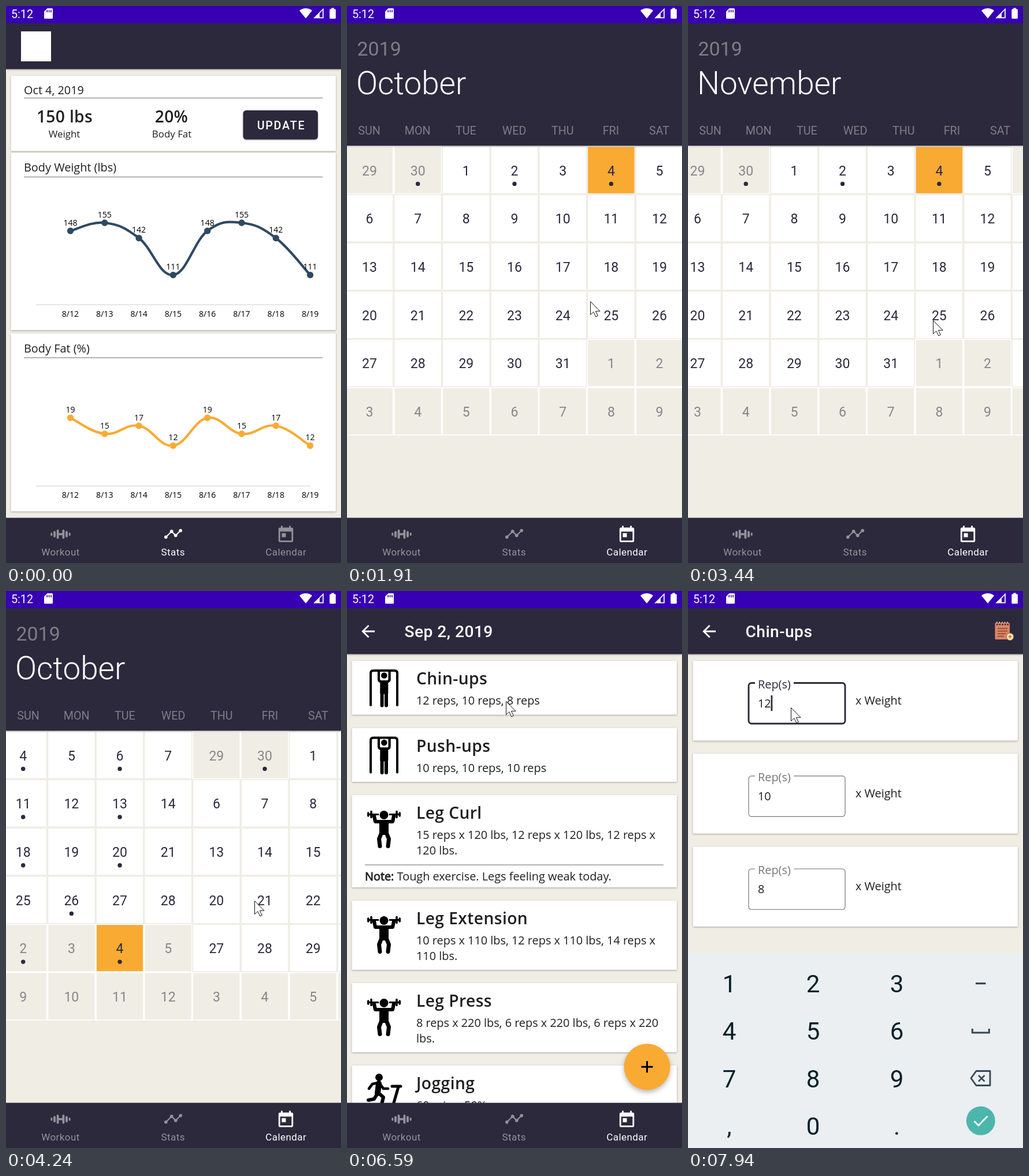
Animation of 580 by 966 pixels, one loop 7.99 s. Source, as an HTML page:

```html
<!DOCTYPE html>
<html lang="en">
<head>
<meta charset="utf-8">
<title>Fitness journal</title>
<style>
html, body { margin: 0; width: 100%; height: 100%; overflow: hidden; background: #efede4; }
svg { display: block; width: 100vw; height: 100vh; }
.card { fill: #fff; filter: drop-shadow(0 1px 1.5px rgba(0,0,0,.32)); }
.bar { filter: drop-shadow(0 1.5px 1.5px rgba(0,0,0,.3)); }
.fab { filter: drop-shadow(0 4px 4px rgba(0,0,0,.28)); }
</style>
</head>
<body>
<svg id="stage" viewBox="0 0 580 966"></svg>
<script>
const LOOP = 7990, DARK = '#2c293d', BEIGE = '#efede4', ORANGE = '#f9aa33', BLUE = '#2e4a62';
const INK = '#1f1f1f', MUTED = '#7f7d86', DIM = '#94929a', KEY = '#37474f', GREY = '#8c8c8c';
const SANS = 'Open Sans,sans-serif', ROBO = 'Roboto,sans-serif';
const BODY = 19.87, CELL = 83.67, PAGE = CELL * 7;

// ---- drawing helpers ----
const text = (x, y, s, size, { fill = INK, w = 400, fam = SANS, mid, ls = 0, id } = {}) =>
  `<text x="${x}" y="${y}" fill="${fill}" style="font:${w} ${size}px ${fam};letter-spacing:${ls}px"` +
  `${mid ? ' text-anchor="middle"' : ''}${id ? ` id="${id}"` : ''}>${s}</text>`;
const rect = (x, y, w, h, fill, more = '') =>
  `<rect x="${x}" y="${y}" width="${w}" height="${h}" fill="${fill}" ${more}/>`;
const dot = (x, y, r, fill = 'currentColor', more = '') =>
  `<circle cx="${x}" cy="${y}" r="${r}" fill="${fill}" ${more}/>`;
const line = (d, stroke, w, more = '') =>
  `<path d="${d}" fill="none" stroke="${stroke}" stroke-width="${w}" ${more}/>`;
const shape = (d, fill) => `<path d="${d}" fill="${fill}"/>`;
const group = (id, body) => `<g id="${id}">${body}</g>`;
const card = (y, h) => `<rect class="card" x="8.5" y="${y}" width="562.5" height="${h}" rx="1"/>`;
const rule = y => line(`M31 ${y}H548`, '#9b9b9b', 1.4);
const ROUND = 'stroke-linecap="round" stroke-linejoin="round"';
const limb = (d, w) => line(d, '#000', w, ROUND);

// ---- status bar ----
const statusBar = rect(0, 0, 580, 30, '#3700b3') +
  text(9, 20.5, '5:12', 19.7, { fill: '#fff', fam: ROBO }) +
  shape('M71.5 4h8a1.5 1.5 0 0 1 1.5 1.5v15a1.5 1.5 0 0 1-1.5 1.5h-12a1.5 1.5 0 0 1-1.5-1.5V9.5z', '#fff') +
  line('M71.2 7v4M74.6 7v4M78 7v4', '#3700b3', 1.6) +
  shape('M519 21.5L508 8a17 17 0 0 1 22 0z', '#fff') +
  line('M549 5.5V20.3H534.3z', '#fff', 1.7) + shape('M543 11.5V21H533z', '#fff') +
  rect(560.3, 5.2, 10.6, 16.8, '#fff', 'rx="1.6"') + rect(563.4, 3.4, 4.4, 3, '#fff');

// ---- stats screen ----
function chart(top, h, title, ys, vals, color) {
  const axis = top + h - 44;
  const pts = [...ys, ...ys].map((y, i) => [111.5 + 59.3 * i, y]);
  const at = i => pts[Math.max(0, Math.min(7, i))];
  let d = `M${pts[0]}`, marks = '';
  pts.forEach((p, i) => {
    if (i) {
      const a = at(i - 1), before = at(i - 2), next = at(i + 1);
      const c1 = a.map((v, k) => v + (p[k] - before[k]) * 0.2);
      const c2 = p.map((v, k) => v - (next[k] - a[k]) * 0.2);
      d += `C${c1} ${c2} ${p}`;
    }
    marks += dot(p[0], p[1], 5.7, color) +
      text(p[0], p[1] - 9.3, vals[i % 4], 14.1, { fill: '#000', mid: 1 }) +
      text(p[0], axis + 20.7, '8/' + (12 + i), 14.1, { fill: '#000', mid: 1 });
  });
  return card(top, h) + text(31, top + 32.5, title, BODY) + rule(top + 42) +
    line(`M52 ${axis}H527`, '#cfcfcf', 1.2) + line(d, color, 4.2) + marks;
}
const figure = { w: 600, mid: 1, ls: .35 };
const stats = card(121, 130.5) + text(31, 153, 'Oct 4, 2019', BODY) + rule(159.5) +
  text(101.5, 202, '150 lbs', 28.2, figure) + text(101, 228, 'Weight', 16.9, { mid: 1 }) +
  text(286.5, 202, '20%', 28.2, figure) + text(287, 228, 'Body Fat', 16.9, { mid: 1 }) +
  rect(410.5, 181, 129.5, 50.5, DARK, 'rx="5.5" class="bar"') +
  text(476.5, 214, 'UPDATE', 19.7, { fill: '#fff', w: 500, fam: ROBO, mid: 1, ls: 1.76 }) +
  chart(254.5, 307.5, 'Body Weight (lbs)', [390, 376, 402.5, 466.5], [148, 155, 142, 111], BLUE) +
  chart(568, 308.5, 'Body Fat (%)', [714.3, 742, 728, 762.5], [19, 15, 17, 12], ORANGE);

// ---- calendar screen ----
const MONTHS = ['September', 'October', 'November'];
const SEP_DAYS = [2, 4, 6, 9, 11, 13, 16, 18, 20, 24, 26, 30];
function monthPage(index) {
  const month = 8 + index, lead = new Date(2019, month, 1).getDay();
  let out = '';
  for (let i = 0; i < 42; i++) {
    const date = new Date(2019, month, 1 - lead + i), day = date.getDate(), m = date.getMonth();
    const inside = m === month, today = m === 9 && day === 4;
    const cx = 39 + CELL * (i % 7), cy = 284.6 + CELL * Math.floor(i / 7);
    const marked = m === 8 ? SEP_DAYS.includes(day) : m === 9 && (day === 2 || day === 4);
    out += rect(cx - 41, cy - 41, 82, 82, today ? ORANGE : inside ? '#fff' : BEIGE,
      `stroke="${inside ? BEIGE : '#fff'}" stroke-width="1.7"`) +
      text(cx, cy + 9, day, 23, { fill: inside || today ? DARK : '#87858a', fam: ROBO, mid: 1 }) +
      (marked ? dot(cx, cy + 23.8, 3.7, DARK) : '');
  }
  return group('page' + index, out);
}
const calendar = MONTHS.map((_, i) => monthPage(i)).join('') +
  rect(0, 30, 580, 212.3, DARK, 'class="bar"') +
  text(17.5, 86, '2019', 33.9, { fill: MUTED, fam: ROBO }) +
  text(16, 153, '', 54.8, { fill: '#fff', w: 300, fam: ROBO, id: 'month' }) +
  ['SUN', 'MON', 'TUE', 'WED', 'THU', 'FRI', 'SAT'].map((d, i) =>
    text(38.5 + CELL * i, 223, d, 19.7, { fill: MUTED, fam: ROBO, mid: 1 })).join('');

// ---- workout list ----
const chinIcon = limb('M41 77V21.5q0-4.5 4.5-4.5H82.5q4.5 0 4.5 4.5V77', 4) +
  dot(64.3, 25.5, 5.3, '#000') + limb('M55 19V32q0 4 4 4h10.600q4 0 4-4V19', 4.2) +
  rect(57.3, 34, 14, 24, '#000', 'rx="2"') + limb('M60.6 50V77.5M68 50V77.5', 6);
const liftIcon = line('M37 33.5H55M73 33.5H91', '#000', 3) + dot(64, 34.5, 7.5, '#000') +
  limb('M36.8 31V36M42 28.5V38.5M86 28.5V38.5M91.2 31V36', 3.6) +
  limb('M47 36L49 46H79L81 36', 6.2) + rect(56, 43, 16, 26, '#000', 'rx="2"') +
  limb('M59.5 66L55.5 76 57 88.5M68.5 66L72.5 76 71 88.5', 7);
const jogIcon = dot(55.5, 20.5, 6.5, '#000') + limb('M55 31L53 48', 10) +
  limb('M53 30L44 32 38 40M57 32L63 40H71', 4.6) +
  limb('M53 48L47 58 37 60M55 48L63 55 60 67', 6) + limb('M78 36H93M89 37L80 68', 5);
const item = (y, h, icon, title, rows) => card(y, h) + `<g transform="translate(0 ${y})">${icon}` +
  text(120, 41, title, 28.2, { w: 600, ls: .42 }) +
  rows.map((r, i) => text(120, 76 + 26.7 * i, r, BODY)).join('') + '</g>';
const list = item(121, 93.5, chinIcon, 'Chin-ups', ['12 reps, 10 reps, 8 reps']) +
  rect(8.5, 121, 562.5, 93.5, '#000', 'id="press" opacity="0"') +
  item(237.5, 93.5, chinIcon, 'Push-ups', ['10 reps, 10 reps, 10 reps']) +
  item(354, 160, liftIcon, 'Leg Curl', ['15 reps x 120 lbs, 12 reps x 120 lbs, 12 reps x', '120 lbs.']) +
  rule(475) +
  text(31, 502, `<tspan stroke="${INK}" stroke-width=".8">Note:</tspan> Tough exercise. Legs feeling weak today.`, BODY) +
  item(537, 120, liftIcon, 'Leg Extension', ['10 reps x 110 lbs, 12 reps x 110 lbs, 14 reps x', '110 lbs.']) +
  item(680, 120, liftIcon, 'Leg Press', ['8 reps x 220 lbs, 6 reps x 220 lbs, 6 reps x 220', 'lbs.']) +
  item(823, 94, jogIcon, 'Jogging', ['60 mins, 50%']);

// ---- set editor ----
const SETS = [12, 10, 8];
const editor = SETS.map((n, i) => {
  const y = 121 + 161.2 * i;
  return card(y, 138.5) + `<g transform="translate(0 ${y})">` +
    line('M183 38.5H267a5 5 0 0 1 5 5V104a5 5 0 0 1-5 5H110a5 5 0 0 1-5-5V43.5a5 5 0 0 1 5-5H116', GREY, 1.4, `id="box${i}"`) +
    text(121, 47.5, 'Rep(s)', BODY, { id: 'label' + i }) + text(121, 81, n, BODY) +
    rect(n > 9 ? 143.5 : 132.5, 60, 2.8, 27, DARK, `id="caret${i}"`) +
    text(290, 76, 'x Weight', BODY) + '</g>';
}).join('');

// ---- toolbar contents ----
const logo = rect(26, 44, 52, 52, '#fff');
const titleStyle = { fill: '#fff', w: 500, fam: ROBO, ls: .45 };
const back = line('M48 70H28M37.5 59.7L27.2 70 37.5 80.3', '#fff', 2.8);
const notepad = rect(531.5, 55, 25.5, 29, '#dc8462', 'rx="1.5"') +
  line('M534 58H555', '#3b2f3a', 2.6, 'stroke-dasharray="2.6 2"') +
  line('M534 54.5H555', '#efe3d6', 2.4, 'stroke-dasharray="1.4 3.2"') +
  line('M536 65H553M536 69.5H553M536 74H550M536 78.5H547', '#7e4638', 1.3) +
  dot(557.5, 79.3, 6.3, '#fbe9b5', 'stroke="#8b5a3c" stroke-width="1"') +
  line('M554.5 79.3h6M557.5 76.3v6', '#b5603c', 1.5);

// ---- bottom navigation ----
const tab = (id, x, label, icon) =>
  group(id, icon + text(x, 953, label, 17, { fill: 'currentColor', fam: ROBO, mid: 1, ls: .45 }));
const dumbbell = line('M78.8 914.7V917.3M110.2 914.7V917.3', 'currentColor', 3, ROUND) +
  line('M84 912.3V919.7M105 912.3V919.7', 'currentColor', 3.8, ROUND) +
  line('M89.6 910V922M99.4 910V922', 'currentColor', 3.8, ROUND) + line('M89 916H100', 'currentColor', 3.6);
const trend = `<g transform="translate(272.6 898.5) scale(1.41)">` + line('M3 16L10 9 15 14 21 8', 'currentColor', 1.5) +
  [[3, 16], [10, 9], [15, 14], [21, 8]].map(p => dot(...p, 2)).join('') + '</g>';
const dates = `<g transform="translate(467.6 900.2) scale(1.41)">` +
  `<path fill="currentColor" fill-rule="evenodd" d="M19 3h-1V1h-2v2H8V1H6v2H5a2 2 0 0 0-2 2v14a2 2 0 0 0 2 2h14a2 2 0 0 0 2-2V5a2 2 0 0 0-2-2zM19 19H5V8h14zM7 10h5v5H7z"/></g>`;
const nav = rect(0, 887.6, 580, 79, DARK) + dot(489, 927, 1, '#fff', 'id="ripple" clip-path="url(#navClip)"') +
  tab('tab0', 94.5, 'Workout', dumbbell) + tab('tab1', 289.2, 'Stats', trend) + tab('tab2', 484.7, 'Calendar', dates);

// ---- keyboard ----
const keyboard = rect(0, 628, 580, 340, '#ebeff2') +
  ['123', '456', '789', ',0.'].map((row, r) => [...row].map((k, c) =>
    text(71.5 + 145 * c, 696 + 82.3 * r, k, 42, { fill: '#06202a', fam: ROBO, mid: 1 })).join('')).join('') +
  rect(498, 679, 17.5, 3.2, KEY) + line('M492.3 759V766H521.3V759', KEY, 3) +
  line('M499 832.5H523V857.5H499L490 845z', KEY, 2.8, 'stroke-linejoin="round"') +
  line('M503 840l10.5 10.5M513.5 840L503 850.5', KEY, 2.6) +
  dot(506.8, 918.8, 25, '#4db6ac') + line('M495.5 919.5l7.5 7.5L518.5 911', '#fff', 2.8);

const stage = document.getElementById('stage');
stage.innerHTML = '<clipPath id="navClip"><rect y="888" width="580" height="78"/></clipPath>' +
  rect(0, 0, 580, 966, BEIGE) + rect(0, 30, 580, 79.5, DARK, 'class="bar"') +
  group('calendar', calendar) + group('logo', logo) + group('back', back) +
  group('dayTitle', text(99.5, 80, 'Sep 2, 2019', 28.2, titleStyle)) +
  group('setTitle', text(99.5, 80, 'Chin-ups', 28.2, titleStyle) + notepad) +
  group('stats', stats) + group('list', list) + group('editor', editor) +
  group('fab', dot(0, 0, 40, ORANGE, 'class="fab"') + group('plus', line('M-10 0H10M0-10V10', '#000', 3))) +
  group('nav', nav) + group('keyboard', keyboard) + statusBar +
  group('cursor', '<path d="M.5.5V23.5L5.8 18.6 9.8 27 13.3 25.3 9.4 17.3H17Z" fill="#fff" stroke="#111"/>');

// ---- motion ----
const ui = {};
stage.querySelectorAll('[id]').forEach(e => ui[e.id] = e);
const set = (id, name, v) => ui[id].setAttribute(name, v);
const ramp = (t, a, b) => Math.max(0, Math.min(1, (t - a) / (b - a)));
const smooth = u => u * u * (3 - 2 * u);
const show = (id, a) => { set(id, 'opacity', a); set(id, 'display', a > 0 ? 'inline' : 'none'); };

const PATH = [[300, 502, 966], [650, 490, 925], [900, 484, 912], [1350, 484, 912], [1870, 421, 512], [1950, 421, 512],
  [2240, 200, 520], [2650, 198, 524], [2760, 198, 524], [2830, 198, 527], [3030, 198, 527], [3292, 424, 545], [3500, 424, 545],
  [3800, 208, 532], [3900, 208, 532], [4218, 428, 537], [4240, 430, 537], [4650, 437, 538], [5210, 118, 271],
  [5900, 118, 271], [6480, 275, 191], [7100, 275, 191], [7600, 178, 202]];
function pointer(t) {
  const i = PATH.findIndex(k => k[0] > t);
  if (i === 0) return PATH[0].slice(1);
  if (i < 0) return PATH[PATH.length - 1].slice(1);
  const [t0, x0, y0] = PATH[i - 1], [t1, x1, y1] = PATH[i], u = smooth(ramp(t, t0, t1));
  return [x0 + (x1 - x0) * u, y0 + (y1 - y0) * u];
}

// Each swipe follows the pointer, then settles on the next page.
const SWIPES = [[1950, 2230, 1, 2], [3030, 3292, 2, 1], [3900, 4218, 1, 0]], SETTLE = 350;
function pager(t) {
  let pos = 1, month = 1;
  for (const [down, up, from, to] of SWIPES) {
    if (t < down) break;
    pos = from + (pointer(down)[0] - pointer(Math.min(t, up))[0]) / PAGE;
    if (t > up) pos = to - (to - pos) * (1 - ramp(t, up, up + SETTLE)) ** 5;
    if (t >= up + SETTLE) month = to;
  }
  return [pos, month];
}

const leave = (t, at) => 1 - ramp(t, at, at + 200);
const enter = (t, at) => ramp(t, at + 106, at + 350);
const TO_CAL = 1120, TO_DAY = 5600, TO_SET = 6760;

function draw(t) {
  const bar = ramp(t, TO_DAY + 10, TO_DAY + 255);
  show('stats', leave(t, TO_CAL));
  show('logo', leave(t, TO_CAL));
  show('calendar', t < TO_DAY ? enter(t, TO_CAL) : leave(t, TO_DAY));
  show('list', t < TO_SET ? enter(t, TO_DAY) : leave(t, TO_SET));
  show('back', bar);
  show('dayTitle', t < TO_SET ? bar : leave(t, TO_SET));
  show('setTitle', enter(t, TO_SET));
  show('editor', enter(t, TO_SET));

  const [pos, month] = pager(t);
  MONTHS.forEach((_, i) => set('page' + i, 'transform', `translate(${(i - pos) * PAGE} 0)`));
  ui.month.textContent = MONTHS[month];

  const s = t < TO_SET ? ramp(t, TO_DAY, TO_DAY + 168) : 1 - ramp(t, TO_SET, TO_SET + 150);
  show('fab', s > 0 ? 1 : 0);
  set('fab', 'transform', `translate(519.5 825.2) scale(${s})`);
  set('plus', 'transform', `rotate(${(1 - s) * 70}) scale(${s ** 3})`);

  const active = t < 1100 ? 1 : 2;
  for (let i = 0; i < 3; i++) set('tab' + i, 'color', i === active ? '#fff' : DIM);
  set('ripple', 'r', 15 + 67 * smooth(ramp(t, 960, 1160)));
  show('ripple', .16 * ramp(t, 960, 1010) * (1 - ramp(t, 1180, 1430)));
  set('press', 'opacity', .1 * ramp(t, 6640, 6720) * (1 - ramp(t, 6820, 7000)));

  const slide = ramp(t, 7130, 7420);
  set('nav', 'transform', `translate(0 ${78 * ramp(t, 7080, 7300) ** 2})`);
  set('keyboard', 'transform', `translate(0 ${340 * (1 - slide) ** 3})`);

  const focus = ramp(t, 7790, 7900);
  SETS.forEach((_, i) => {
    const f = i === 0 ? focus : i === 2 ? 1 - focus : 0;
    set('box' + i, 'stroke', f > .5 ? DARK : GREY);
    set('box' + i, 'stroke-width', 1.4 + 1.5 * f);
    set('label' + i, 'fill', f > .5 ? DARK : '#77767b');
    show('caret' + i, f > .5 && (i === 0 || (t - 7100) % 1000 < 800) ? 1 : 0);
  });

  set('cursor', 'transform', `translate(${pointer(t)})`);
}

const start = performance.now();
(function tick() {
  draw((performance.now() - start) % LOOP);
  requestAnimationFrame(tick);
})();
</script>
</body>
</html>
```
